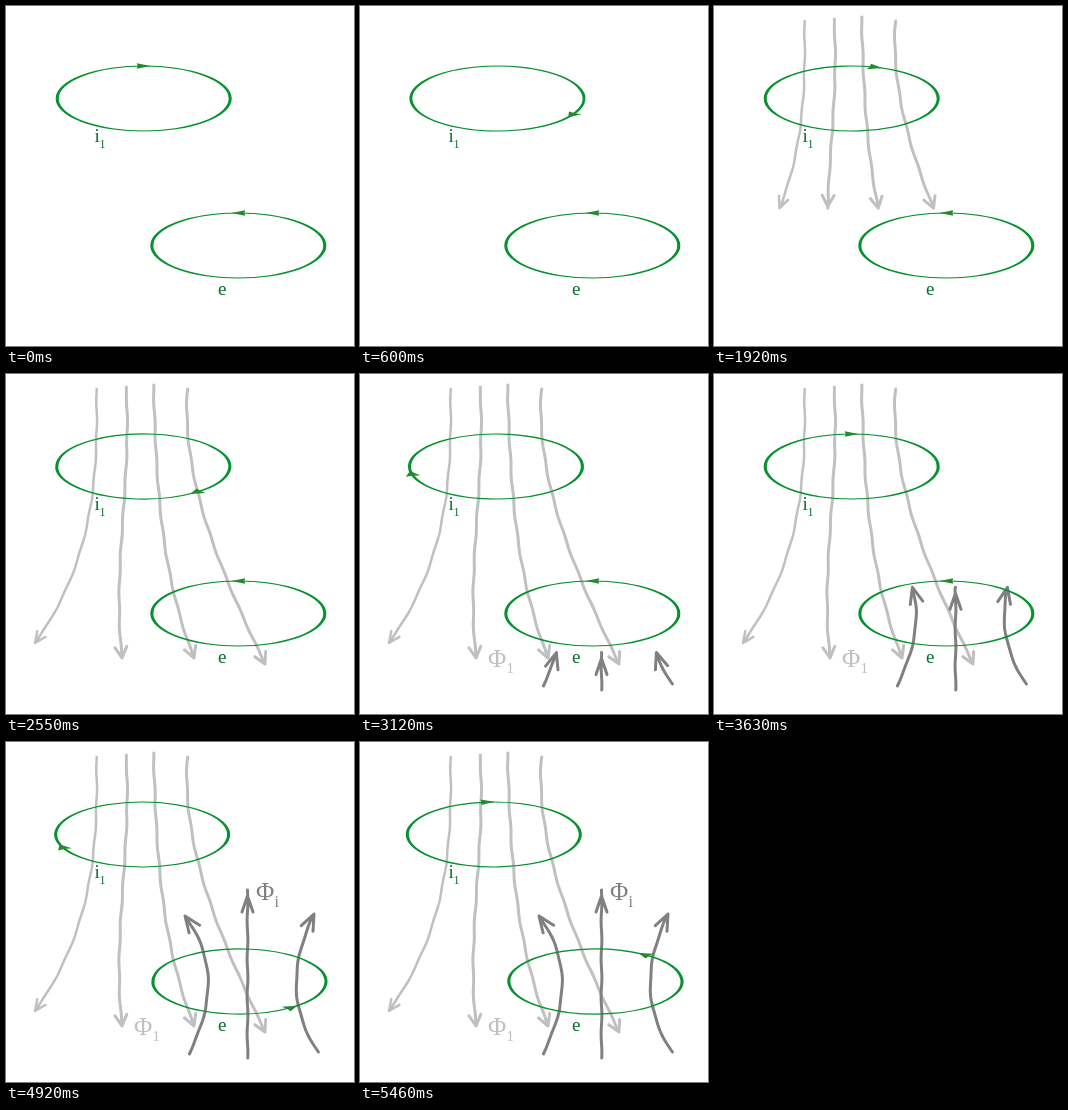
An HTML page for the animation above (5.49 s loop, 348 by 340 pixels).

```html
<!DOCTYPE html>
<html lang="en">
<head>
<meta charset="utf-8">
<title>Induced flux</title>
<style>
  html, body { margin: 0; width: 100%; height: 100%; overflow: hidden; background: #fff; }
  svg { display: block; width: 348px; height: 340px; font-family: "Liberation Serif", Times, serif; }
  #flux path { fill: none; stroke-linecap: round; stroke-linejoin: round; }
  .ring circle { fill: none; stroke: #07912f; stroke-width: 3.1; }
  .ring path { fill: #258a2e; }
</style>
</head>
<body>
<svg viewBox="0 0 348 340">
  <g id="flux"></g>
  <g id="primary" class="ring"><circle r="86.5"/><path d="M7 -86.5L-7 -94L-6 -86.5L-7 -79Z"/></g>
  <g id="secondary" class="ring"><circle r="86.5"/><path d="M-7 -86.5L7 -94L6 -86.5L7 -79Z"/></g>
  <g fill="#07702c">
    <text x="88.5" y="136" font-size="19">i</text>
    <text x="93.5" y="142" font-size="12">1</text>
    <text x="212" y="289" font-size="19">e</text>
  </g>
  <g id="phi1" fill="#c0c0c0">
    <text x="128" y="293" font-size="25">Φ</text>
    <text x="146.5" y="299" font-size="15">1</text>
  </g>
  <g id="phiI" fill="#808080">
    <text x="250" y="158" font-size="25">Φ</text>
    <text x="268.5" y="165" font-size="16">i</text>
  </g>
</svg>
<script>
const LOOP = 5490, STEP = 30, TURN = 1790, DRIFT = 4;
const get = id => document.getElementById(id);
const clamp = (v, lo, hi) => Math.min(hi, Math.max(lo, v));

const DOWN = { start: 640, from: 14, speed: 0.147, color: "#c0c0c0", width: 3, back: 11, half: 6 };
const UP = { start: 2820, from: 317, speed: -0.128, color: "#808080", width: 3, back: 16, half: 6.5 };
const noLag = () => 0;

// Cubic through four values at 0, 1/3, 2/3 and 1.
const cubic = (a, b, c, d) => u => {
  const p = 3 * u - 1, q = 3 * u - 2, r = 3 * u - 3;
  return -p * q * r * a / 6 + 3 * u * q * r * b / 2 - 3 * u * p * r * c / 2 + u * p * q * d / 2;
};

// A line runs from height y0 to y1; lag keeps its head behind the tip, given the part still hidden.
function fieldLine(style, y0, y1, curve, lag = noLag) {
  const el = document.createElementNS("http://www.w3.org/2000/svg", "path");
  el.setAttribute("stroke", style.color);
  el.setAttribute("stroke-width", style.width);
  get("flux").append(el);
  return { ...style, y0, y1, lag, el, x: y => curve((y - y0) / (y1 - y0)) };
}

const lines = [
  fieldLine({ ...DOWN, width: 2.5, half: 5 }, 15, 269, cubic(90.5, 88.5, 72, 29)),
  fieldLine(DOWN, 13, 284, cubic(120, 119.5, 114, 116), left => 20 * left * left),
  fieldLine(DOWN, 11, 284, cubic(147.5, 151.5, 162.5, 188)),
  fieldLine(DOWN, 15, 290, cubic(181.5, 189, 218, 259)),
  fieldLine(UP, 312, 174, cubic(183, 199.5, 200, 179)),
  fieldLine({ ...UP, half: 5.5 }, 316, 148, () => 241.5, () => 6),
  fieldLine(UP, 310, 172, cubic(312, 292.5, 292.5, 308))
];

function shaft(line, tip, dir) {
  const points = [];
  for (let y = line.y0; (tip - y) * dir > 0; y += 3 * dir) {
    points.push(`${line.x(y) + 0.4 * Math.sin(y / 6)} ${y}`);
  }
  points.push(`${line.x(tip)} ${tip}`);
  return "M" + points.join("L");
}

function head({ x, back, half }, y, dir) {
  const slope = x(y) - x(y - dir);
  const len = Math.hypot(slope, 1);
  const ux = slope / len, uy = dir / len;
  const barb = s => `${x(y) - ux * back - uy * half * s} ${y - uy * back + ux * half * s}`;
  return `M${barb(1)}L${x(y)} ${y}L${barb(-1)}`;
}

function drawLine(line, t) {
  const { y0, y1, from, speed, start } = line;
  const dir = Math.sign(speed);
  const shown = (from + (t - start) * speed - y0) * dir;
  if (t < start || shown <= 0) {
    line.el.setAttribute("d", "");
    return;
  }
  const length = Math.abs(y1 - y0);
  const reach = Math.min(shown, length);
  const headReach = clamp(reach - line.lag(1 - reach / length), 1, length);
  line.el.setAttribute("d",
    shaft(line, y0 + dir * reach, dir) + head(line, y0 + dir * headReach, dir));
}

// A flattened circle that turns once, drifting sideways ever faster, then snaps back.
function drawRing(id, cx, cy, dir, starts, t) {
  const start = starts.filter(s => s <= t).pop();
  let turn = start === undefined ? 0 : (t - start) / TURN;
  if (turn >= 1) turn = 0;
  get(id).setAttribute("transform",
    `translate(${cx - dir * DRIFT * turn ** 2.5} ${cy}) scale(1 .376) rotate(${dir * 360 * turn})`);
}

function draw(t) {
  lines.forEach(line => drawLine(line, t));
  drawRing("primary", 137.7, 92.5, 1, [0, 1840, 3690], t);
  drawRing("secondary", 232.3, 239.5, -1, [3840], t);
  get("phi1").style.display = t >= 2640 ? "" : "none";
  get("phiI").style.display = t >= 4500 ? "" : "none";
}

const begin = performance.now();
function tick() {
  const t = (performance.now() - begin) % LOOP;
  draw(Math.floor(t / STEP) * STEP);
  requestAnimationFrame(tick);
}
tick();
</script>
</body>
</html>
```
